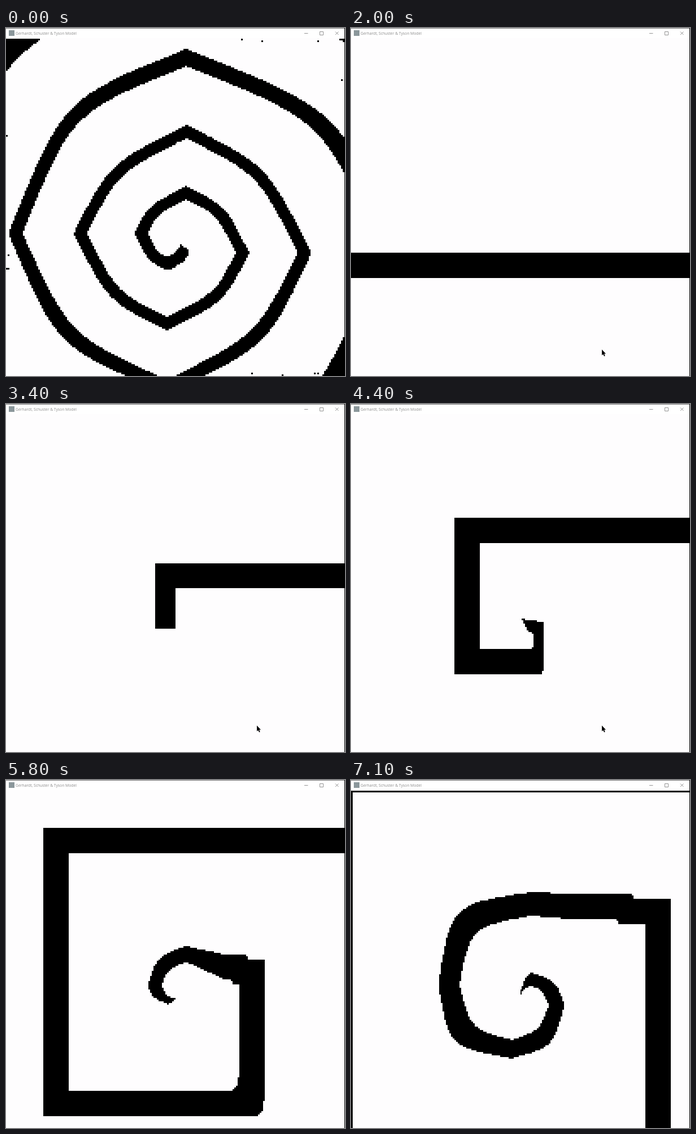
An HTML page with a canvas that plays this animation: 600x618 px, repeating every 7200 ms.

```html
<!DOCTYPE html>
<html lang="en">
<head>
<meta charset="utf-8">
<title>Gerhardt, Schuster &amp; Tyson Model</title>
<style>
  html, body { margin: 0; width: 100%; height: 100%; overflow: hidden; background: #fefdfe; }
  #stage { position: relative; width: 600px; height: 618px; overflow: hidden; background: #fefdfe; }
  #stage > * { position: absolute; }
  #bar { left: 0; top: 0; width: 600px; height: 18px; background: #fff; border-top: 1px solid #777; box-sizing: border-box; }
  #icon { left: 5px; top: 4px; width: 10px; height: 10px; background: #8b979b; }
  #name { left: 17px; top: 4px; font: 6.77px/11px "Open Sans", "Noto Sans", sans-serif; color: #8c8c8c; white-space: nowrap; }
  #grid { left: 0; top: 19px; }
  #edge { left: 598.5px; top: 0; width: 1.5px; height: 618px; background: #000; }
  svg { left: 0; top: 0; }
</style>
</head>
<body>
<div id="stage">
  <div id="bar"></div>
  <div id="icon"></div>
  <div id="name">Gerhardt, Schuster &amp; Tyson Model</div>
  <canvas id="grid" width="599" height="599"></canvas>
  <svg width="600" height="618">
    <path d="M528 9.5h6.5M555.5 6.5h6v6h-6zM583 6.5l5.5 5.5M588.5 6.5l-5.5 5.5" fill="none" stroke="#888" stroke-width=".9"/>
    <path id="cursor" d="M444 571v10.2l2.3-2 1.7 3.8 1.7-.8-1.6-3.6h3z"/>
  </svg>
  <div id="edge"></div>
</div>
<script>
const LOOP = 7200, TICK = 100;
const CELL = 3, N = 200, TOP = 18;   // the model: N x N cells
const FAST = 9, SLOW = 6;            // front speed in px per step, fresh and tired medium
const BAND = 45;                     // thickness of a fresh wave
const CX = 303, CY = 382;            // core of the spiral

const view = document.getElementById('grid').getContext('2d');
const cursor = document.getElementById('cursor');
const small = document.createElement('canvas');
small.width = small.height = N;
const pen = small.getContext('2d', { willReadFrequently: true });
view.imageSmoothingEnabled = false;

const clamp = (v, a, b) => Math.max(a, Math.min(b, v));
const box = (x0, y0, x1, y1) => pen.fillRect(x0, y0, x1 - x0, y1 - y0);
const lines = (...pts) => pts.forEach(p => pen.lineTo(...p));

// A front is a chain of corners, newest first, that lie clockwise around the core:
// right, down, left, up. Each pair is joined by a curve whose sides lean by slope(d).
function front(reach, turn, slope) {
  return reach.slice(1).map((d2, i) => {
    const d1 = reach[i], q = (turn + i) % 4;
    const ux = [1, 0, -1, 0][q], uy = [0, 1, 0, -1][q];
    const place = (u, v) => [CX + ux * u - uy * v, CY + uy * u + ux * v];
    const o1 = Math.min(17, d1), o2 = Math.min(17, d2);
    const s = slope((d1 + d2) / 2), a = d1 + s * o1, b = d2 - s * o2;
    const u = (a - s * b) / (1 - s * s);
    return [place(d1, o1), place(u, b - s * u), place(-o2, d2)];
  });
}

function trace(arcs) {
  for (const [from, apex, to] of arcs) {
    pen.lineTo(...from);
    pen.bezierCurveTo(...apex, ...apex, ...to);
  }
}

const backward = arcs => arcs.map(arc => [...arc].reverse()).reverse();

// ---- Grown spiral, n steps on ----
const wideSlope = d => clamp(.5 - (d - 230) * .0015, .4, .5);

function spiral(n) {
  const out = [], inn = [];
  for (let c = -8; c < 17; c++) {
    const way = 15 + SLOW * n + 28 * c;
    const r = Math.max(0, way + 8 * clamp(1 - way / 160, 0, 1));
    const lead = Math.max(0, way - 290);   // outer turns run into a fresher medium
    out.push(r + .7 * lead);
    inn.push(Math.max(0, r - Math.min(24, 8 + .4 * r) + .5 * lead));
  }
  pen.beginPath();
  trace(front(out, 0, wideSlope));
  trace(backward(front(inn, 0, wideSlope)));
  pen.fill();
  specks();
}

// Stray live cells along the border
function specks() {
  let seed = 7;
  const rand = () => (seed = seed * 16807 % 2147483647) / 2147483647;
  for (let i = 0; i < 16; i++) {
    const along = Math.floor(rand() * N), off = Math.floor(rand() * 2);
    const [x, y] = [[along, off], [off, along], [along, N - 1 - off], [N - 1 - off, along]][i % 4];
    box(x * CELL, TOP + y * CELL, (x + 1) * CELL, TOP + (y + 1) * CELL);
  }
}

// ---- Flat wave moving up ----
function flatWave(f) {
  const y = 399 - FAST * (Math.min(f, 29) - 20);
  box(0, y, 600, y + BAND);
}

// ---- Cut wave: its free end turns round and curls up, m steps after the cut ----
const curlSlope = d => clamp(.5 - .0025 * d, .15, .5);

function curl(m) {
  const grown = FAST * m;
  const left = 300 - grown, top = 318 - grown, low = 363 + grown, lowIn = low - BAND;
  box(left, top, 600, top + BAND);
  box(left, top, Math.min(left + BAND, 300), low);
  box(left, lowIn, 300, low);
  if (m < 8) return;

  // arm that climbs on the right, with a step at its upper end
  const right = Math.max(300, 224 + grown);
  const e = Math.min(1, (right - 300) / 112);
  const rightIn = right - BAND * e;
  const y = Math.min(390, 552 - grown), yIn = y + BAND * e, step = 9 * e;
  const x = Math.min(269 + 6 * m, right), xIn = Math.min(x - 27, rightIn);

  const out = [], inn = [];
  for (let k = 6; k >= 0; k--) {
    const r = Math.max(0, 8 * (m - 15 - 4.5 * k));
    out.push(r);
    inn.push(r - Math.min(.6 * r, 18 + .13 * r));
  }

  pen.beginPath();
  lines([290, low], [right - 15 * e, low]);
  pen.quadraticCurveTo(right, low, right, low - 34 * e);
  lines([right, y], [Math.min(x + 6, right), y], [x, y - step], [Math.min(388, x), y - step]);
  trace(backward(front(out, 1, curlSlope)));
  trace(front(inn, 1, curlSlope));
  lines([Math.min(388, xIn), yIn - step], [xIn, yIn - step], [Math.min(xIn + 6, rightIn), yIn],
    [rightIn, yIn], [rightIn, lowIn - 32 * e]);
  pen.quadraticCurveTo(rightIn, lowIn, rightIn - 15 * e, lowIn);
  lines([290, lowIn]);
  pen.fill();
}

// The model skips a step at these ticks
const holds = [33, 42, 52, 62];

function draw(f) {
  pen.setTransform(1, 0, 0, 1, 0, 0);
  pen.clearRect(0, 0, N, N);
  pen.setTransform(1 / CELL, 0, 0, 1 / CELL, 0, -TOP / CELL);
  if (f < 16) spiral(f);
  else if (f < 31) flatWave(f);
  else curl(f - 29 - holds.filter(h => h <= f).length);

  // every cell is either on or off
  const img = pen.getImageData(0, 0, N, N), px = img.data;
  for (let i = 3; i < px.length; i += 4) px[i] = px[i] > 127 ? 255 : 0;
  pen.putImageData(img, 0, 0);
  view.clearRect(0, 0, 599, 599);
  view.drawImage(small, 0, 0, 599, 599);
  cursor.style.display = f >= 17 && f < 63 ? '' : 'none';
}

const start = performance.now();
let shown = -1;
function tick() {
  const f = Math.floor((performance.now() - start) % LOOP / TICK);
  if (f !== shown) draw(shown = f);
  requestAnimationFrame(tick);
}
tick();
</script>
</body>
</html>
```
